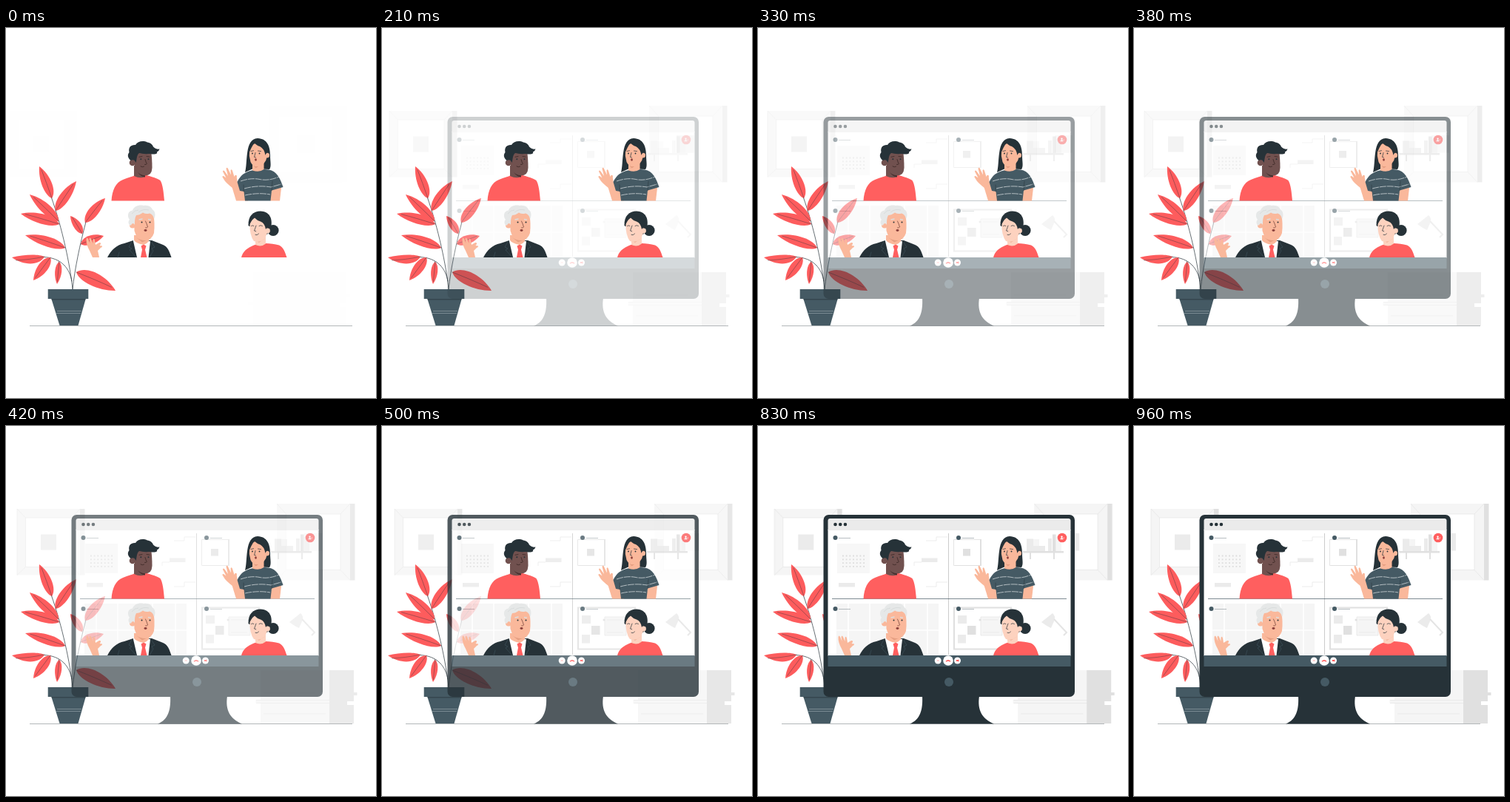
Write an HTML page that moves like this. It is 500 px wide and 500 px high and loops after 1040 ms.

```html
<!DOCTYPE html>
<html lang="en">
<head>
<meta charset="utf-8">
<title>Video call</title>
<style>
  html, body { margin: 0; width: 100%; height: 100%; overflow: hidden; background: #fff; }
  svg { display: block; width: 100vw; height: 100vh; }
  #room, #monitor { animation: 1040ms -3ms infinite both; }
  #room { animation-name: slide; }
  #monitor { animation-name: fade; }

  @keyframes slide {
    0% { transform: translateX(-18px); opacity: .03; animation-timing-function: steps(12, end); }
    48.08% { transform: translateX(-6px); opacity: .76; animation-timing-function: steps(2, end); }
    56.09% { transform: translateX(-4.2px); opacity: .87; animation-timing-function: step-end; }
    64.1% { transform: translateX(-2.6px); opacity: .94; animation-timing-function: step-end; }
    72.12% { transform: translateX(-1.5px); opacity: .98; animation-timing-function: step-end; }
    80.13% { transform: translateX(-.8px); opacity: 1; animation-timing-function: step-end; }
    92.3%, 100% { transform: none; opacity: 1; }
  }
  @keyframes fade {
    0%, 8.01% { opacity: 0; animation-timing-function: step-end; }
    12.02% { opacity: .055; animation-timing-function: steps(9, end); }
    48.08% { opacity: .8; animation-timing-function: steps(2, end); }
    56.09% { opacity: .96; animation-timing-function: step-end; }
    60.1%, 100% { opacity: 1; }
  }

  .dark { fill: #263238; }
  .slate { fill: #455a64; }
  .red { fill: #ff5f5f; }
  .skin { fill: #fab89b; }
  .fair { fill: #fdd2bf; }
  .brown { fill: #71514f; }
  .white { fill: #fff; }
  .g1 { fill: #f5f5f5; }
  .g2 { fill: #ebebeb; }
  .g3 { fill: #e0e0e0; }
  .line { fill: none; stroke: #263238; stroke-width: .7; stroke-linecap: round; stroke-linejoin: round; }
  .pale { fill: none; stroke: #e4e4e4; stroke-width: .7; }
</style>
</head>
<body>
<svg viewBox="0 0 500 500" preserveAspectRatio="none">

  <g id="room">
    <!-- left picture -->
    <path class="g3" d="M108 112h6.500v89.500h-6.500z"/>
    <path class="g1" d="M23 112h85v89.500h-85z"/>
    <path class="white" d="M34.500 124h62.500v66.500h-62.500z"/>
    <path class="pale" d="M23 112l11.500 12h62.500l11-12M23 201.500l11.500-11V124M97 124v66.500H34.500M97 190.500l11 11M23 201.500V112"/>
    <path class="g2" d="M55 146.500h21v21h-21z"/>
    <!-- right picture -->
    <path class="g3" d="M473 105h6.500v103.500h-6.500z"/>
    <path class="g1" d="M374 105h99v103.500h-99z"/>
    <path class="white" d="M386.500 119h73.500v75.500h-73.500z"/>
    <path class="pale" d="M374 105l12.500 14h73.500l13-14M386.500 119v75.500h73.500V119M460 194.500l13 14M386.500 194.500l-12.500 14"/>
    <path class="g2" d="M411 145h24v23.500h-24z"/>
    <!-- boxes -->
    <path class="g1" d="M352 330h93v72h-93z"/>
    <path class="g1" d="M345.500 370h99.500v4.500h-99.500z"/>
    <path class="pale" d="M346 370.500h99M346 374.500h99M356 361h70M356 389h84"/>
    <path class="g3" d="M445 330h33v30h4.500v4h-4.500v38h-33z"/>
    <path class="white" d="M469 372h9.500v5h-9.500z"/>
  </g>

  <path d="M32 402.400H468" stroke="#263238" stroke-width=".6" opacity=".65"/>

  <g id="plant">
    <path class="line" d="M90 353C87 322 76 270 61 228M90 353C93 325 100 292 108 262M89 342C86 326 76 310 50 309.500M71 316Q73 319 74 322"/>
    <g id="leaves"></g>
    <path class="slate" d="M61 365h47l-10.500 37h-25z"/>
    <path class="dark" d="M61.300 366h46.400l-.4 1.400H61.700z" opacity=".5"/>
    <path class="slate" d="M56.700 353h54.600v13h-54.600z"/>
    <path d="M69 382.500h33M67 385.500h34" stroke="#9fadb4" stroke-width=".6"/>
  </g>

  <g id="monitor">
    <path class="dark" d="M222 365C223 384 219 397 205 402.500H319C303 396 296 384 299 365z"/>
    <rect class="dark" x="88.500" y="120" width="339.500" height="246" rx="7"/>
    <path class="white" d="M94.500 140h328v171h-328z"/>
    <path class="g2" d="M94.500 141V128q0-3 3-3h322q3 0 3 3v13z"/>
    <path class="slate" d="M94.500 310h328v15h-328z"/>
    <circle class="slate" cx="258" cy="346" r="6"/>
    <g class="dark">
      <circle cx="104.500" cy="133" r="2.300"/><circle cx="111.200" cy="133" r="2.300"/><circle cx="117.900" cy="133" r="2.300"/>
    </g>

    <!-- top left wall -->
    <path class="g1" d="M107 159h44v40h-44z" opacity=".8"/>
    <path d="M114 175.500h30M114 180.300h30M114 185.100h30M114 189.900h30" stroke="#dcdcdc" stroke-width="1.800" stroke-dasharray="1.800 2.900"/>
    <path class="g2" d="M109 212h22v5.500h-22zM221 178.500h21.500v5.500h-21.500z"/>
    <path class="pale" d="M256 150h-15v5h-14M221 184h-10v5M256 211h-15v6h-14"/>

    <!-- top right wall -->
    <path d="M264.500 153.500h36v35h-36z" fill="#fff" stroke="#e4e4e4"/>
    <path class="g3" d="M300 153h2v36h-36v-1h34zM277 166h10v9.500h-10z"/>
    <path class="g2" d="M363 152.500h9v16.500h-9zM372 162h16v7h-16zM392 152h5v17h-5z"/>
    <path class="g1" d="M372 153h8v9h-8zM403 150h7v19h-7z"/>
    <path class="g3" d="M398 146.500h4.500v22.500h-4.500zM358 169h55v2.500h-55zM367 171h2v9h-2zM399 171h2v9h-2z"/>

    <!-- bottom left window -->
    <path class="g1" d="M106 240h138v70h-138z"/>
    <path d="M122 240v70M151 240v70M198 240v70M229 240v70M106 276h138" stroke="#fff" stroke-width="1.600"/>

    <!-- bottom right wall -->
    <path d="M265 245.500h77v56h-77z" fill="#fff" stroke="#e0e0e0" stroke-width="2.200"/>
    <path class="g2" d="M270 256h12v11h-12zM270 282h11v11.500h-11z"/>
    <path class="g3" d="M283 270h11.500v12h-11.500z"/>
    <path d="M301 258h29v25h-29z" fill="#f5f5f5" stroke="#e4e4e4" stroke-width=".7"/>
    <path class="pale" d="M304 262h20M304 279h22"/>
    <circle class="g3" cx="300" cy="262" r="1.500"/>
    <path class="g2" d="M383 265L398 253Q403 257 400 264L396 273Q391 271 383 265z"/>
    <path class="pale" d="M400 261L417 279L413 283" style="stroke-width:2"/>

    <!-- dividers and labels -->
    <path d="M257.500 145V309" stroke="#b5b5b5" stroke-width=".7"/>
    <path d="M100 233.500H417" stroke="#455a64" stroke-width=".7"/>
    <g class="slate">
      <circle cx="104.500" cy="151" r="3"/><circle cx="271" cy="151" r="3"/>
      <circle cx="104.500" cy="247" r="3"/><circle cx="271" cy="247" r="3"/>
    </g>
    <path d="M109 151.500h16M276 151.500h16M109 247.500h16M276 247.500h16" stroke="#a5adb1" stroke-width=".8"/>

    <!-- call buttons -->
    <circle class="red" cx="411" cy="151" r="6.300"/>
    <circle class="white" cx="410.500" cy="149.700" r="1.200"/>
    <path class="white" d="M408.400 153.200q0-2 2.100-2t2.100 2zM412.600 150.700h1.500v.7h-1.500z"/>
    <g class="white">
      <circle cx="243.200" cy="317" r="4.500"/><circle cx="257" cy="317" r="6.800"/><circle cx="269.500" cy="317" r="4.500"/>
    </g>
    <path d="M254 318.300q3-2.800 6 0" fill="none" stroke="#ff5f5f" stroke-width="1.500"/>
    <path class="red" d="M267.800 316h2.200l1.500-.5v3l-1.500-.5h-2.200z"/>
    <path d="M241.700 317h3" stroke="#ff9f9f"/>
  </g>

  <!-- man in red -->
  <g>
    <path class="red" d="M142.500 233.500C143.500 219 148 209 158 205C165 202 171 201 175 198.500H189C196 201 205 203 208.500 206C212 211 213 223 214 233.500z"/>
    <path class="brown" d="M173 186h15v15q-7 3-15-1z"/>
    <path d="M178 195q5 4 10 4v2.500q-5 0-10-6.500z" fill="#46302f"/>
    <path class="brown" d="M174 170L196 166Q197.500 176 197.500 189Q197 199.500 188 199.500Q177 198 174 188z"/>
    <circle class="brown" cx="171" cy="182" r="4.300"/>
    <path class="dark" d="M168.500 179C164 175 164 171 166.500 168C165 161 169 157.500 175 158C178 152.500 186 152 191 154.500C195 155 198 157.500 199 160.500C202 163.500 205 164 207.500 163.500Q207 166 204 167.500Q205 169 203 170C198 171.500 195 169.500 192 170C187 171 183 169 180 169C176 172 177 178 175.500 182Q173.500 176.500 168.500 179z"/>
    <path class="line" d="M180 174.300l4-.8M190 173.500l4 .6M188 177.500q1 4 2.300 6q-1 1.500-2.800 1M182 187q2.500 1.500 4.500 .2" style="stroke:#33211f"/>
    <circle class="dark" cx="182.300" cy="177.300" r="1"/><circle class="dark" cx="192.500" cy="177.300" r="1"/>
  </g>

  <!-- woman in stripes -->
  <g>
    <path class="dark" d="M323 195C327 183 322 149.500 340 149C353 149.500 357 160 357 172C357 181 359 187 356 191L334 190z"/>
    <path class="skin" d="M316 207L327 231V233.500H311L304.500 212z"/>
    <path class="skin" d="M306 216C302 213 298 209.500 296 207L292.500 201.500Q292 199.500 294 200L297.500 202.500L293 194Q293 191.500 295 193L300 200L297.500 190Q298.500 187.500 300 190L304 198.500L303.500 192.500Q305 190 306 193L308.500 201L309.500 199Q312.500 198 311.800 202L313 210z"/>
    <path class="skin" d="M359 216h13L370 233.500H357z"/>
    <path class="slate" d="M312.500 208C317 199 322 195 332 192.500C338 190.500 346 190 355 191.500C366 193 371 204 374.500 215L359 219.500L357.500 233.500H323L321.500 221L316 220z"/>
    <path d="M317 207q14-5 26-2.500t26-3.500M322 217q18-5 36-2l14-4M323 226q18-4 34-1" fill="none" stroke="#e3e7e9" stroke-width=".7" stroke-dasharray="9 1"/>
    <path class="line" d="M359 219.500L360 207M321.500 221L321 212" style="stroke-width:.5"/>
    <path class="skin" d="M333 181h15.500v10q-6 4.500-15.500 1.500z"/>
    <path d="M334.500 186q5 3 13-3.500l-10 7z" fill="#e59f82"/>
    <path class="skin" d="M329 165Q332 155 340 156Q349 157 353 167Q354 181 344 186.500Q334 189 330.500 181Q328 173 329 165z"/>
    <circle class="skin" cx="352.500" cy="172" r="3.500"/>
    <path class="dark" d="M327.500 172Q327 152 340 151.500Q353 152 354.500 168.500Q351.500 168 350.500 172Q349 163 343 160Q338 158.500 336 155Q331 161 327.500 172z"/>
    <path class="line" d="M331 166.500l3.500-.8M340.500 166l4 .6M337 168.500l-1.500 6l2 .4"/>
    <circle class="dark" cx="333" cy="169.500" r=".9"/><circle class="dark" cx="342.500" cy="169.500" r=".9"/>
    <ellipse cx="337.500" cy="178" rx="1.400" ry="1.700" fill="#8a3f3b"/>
  </g>

  <!-- man in suit -->
  <g>
    <path class="skin" d="M117 310L113 301Q108 292 108.500 285Q109.500 282 111 285L113.500 291L112.500 285Q113.500 282 115 285L117.500 291L117.500 286Q119 283 120 287L121 293L126 290Q130 290 126.500 294L130 294.500Q130.500 296 128 297L124 301L126 310z"/>
    <path class="dark" d="M137 310C142 300 149 293.500 160 291L172 287H197L211 292.500C219 295 221 303 223.500 310z"/>
    <path class="white" d="M171.500 286L195 288L192.500 310H177z"/>
    <path class="line" d="M170 289L166 296l4 2l-3 2L176 310M197 290l4 6l-4 2l2 3l-5 9M151 310l2-7" style="stroke:#455a64;stroke-width:.5"/>
    <path class="red" d="M182.500 294.500l3.500-2l3.500 2l-1.500 5l2.500 10.500h-8.500l2-10.500z"/>
    <path class="skin" d="M173 280h20v8Q190 292 186 293Q176 291 173 287z"/>
    <path d="M176 283q7 5 15 3.500l-7 3z" fill="#e59f82"/>
    <path class="skin" d="M173 254Q185 245 199 250Q201.500 264 200 277Q197 287 187.500 287Q176 286 173.500 274z"/>
    <circle class="skin" cx="171" cy="266.500" r="4"/>
    <path d="M168.500 267C164.500 265 165 261 167 259C163 254 165 247 171 246.500C173 240.500 180 238.500 186 240C192 238.500 197 242 198 245.500C202 247.500 202.500 254 200 258Q199 252 194 250.500Q189 252 185 249.500Q180 253 176 253Q173.500 258 174 266Q171.500 261.500 168.500 267z" fill="#e6e8e8"/>
    <path d="M170 251q4-5 9-5M179 249q6-5 14-3" fill="none" stroke="#cfd3d4" stroke-width=".6"/>
    <path d="M179.500 259l5-1M192 258.500l4 .6" stroke="#dcdedf" stroke-width="1.300"/>
    <path class="line" d="M188.500 261q2 4 3 8q-1 1.500-3 1" style="stroke:#6b3a32"/>
    <circle class="dark" cx="183.500" cy="262.500" r="1"/><circle class="dark" cx="194.500" cy="262.500" r="1"/>
    <ellipse cx="188.500" cy="273.500" rx="2" ry="1.400" fill="#8a3f3b"/>
  </g>

  <!-- woman with bun -->
  <g>
    <circle class="dark" cx="361" cy="273.500" r="7.600"/>
    <path class="red" d="M318 310C320 302 326 297 335 293.500C345 290 358 290.500 369 293.500C375 296 377 303 379.500 310z"/>
    <path class="fair" d="M337 282h14v9.500q-6 5-14 1.500z"/>
    <path d="M338 288q6 2 12-4l-8 6z" fill="#f0b39a"/>
    <path class="dark" d="M327.500 267C327 254 334 247.500 344 247.500C355 248 361 256 358 270L353 279z"/>
    <path class="fair" d="M329.500 265Q332 255 340 255Q348 257 353 267Q355 279 348 285.500Q341 290.500 335 288Q329 280 329.500 265z"/>
    <circle class="fair" cx="353.500" cy="274" r="3.400"/>
    <path class="dark" d="M328 268.500Q327 255 338 252Q353 253 355.500 270Q352 269.500 351 272Q350 264 344 261.500Q339 260 336 256.500Q331 260 328 268.500z"/>
    <path class="line" d="M331.500 267.500q2-1.500 3.500 0M342 267.500q2-1.800 4.500 0M338 267l-2.500 7l2.200.6M337 279.500q2.500 1.200 4.500-1.500"/>
  </g>
</svg>
<script>
  // base x, base y, tip x, tip y, half width, sideways bend
  const leaves = [
    [62, 230, 45, 187, 9, 1], [67, 247, 95, 207, 9, -1], [71, 261, 32, 225, 9, 1],
    [72, 265, 20, 251, 9, 1], [80, 297, 26, 280, 9, 1], [52, 309, 8, 310, 8, -4],
    [60, 310, 37, 341, 9, 0], [72, 316, 69, 346, 6, 0], [103, 278, 87, 254, 7, 1],
    [107, 263, 134, 230, 9, -1], [101, 292, 132, 281, 8, -1], [95, 330, 148, 355, 12, -2]
  ];

  function leaf([x, y, tx, ty, w, bend]) {
    const dx = tx - x, dy = ty - y, len = Math.hypot(dx, dy);
    const at = (k, side) => {
      const off = (w * side + bend) / len;
      return `${(x + dx * k - dy * off).toFixed(1)} ${(y + dy * k + dx * off).toFixed(1)}`;
    };
    return `<path fill="#fd5c5d" d="M${x} ${y}C${at(.15, 1)} ${at(.65, 1)} ${tx} ${ty}C${at(.65, -1)} ${at(.15, -1)} ${x} ${y}z"/>` +
      `<path class="line" style="stroke-width:.4" d="M${x} ${y}Q${at(.5, 0)} ${at(.88, 0)}"/>`;
  }
  document.getElementById('leaves').innerHTML = leaves.map(leaf).join('');
</script>
</body>
</html>
```
